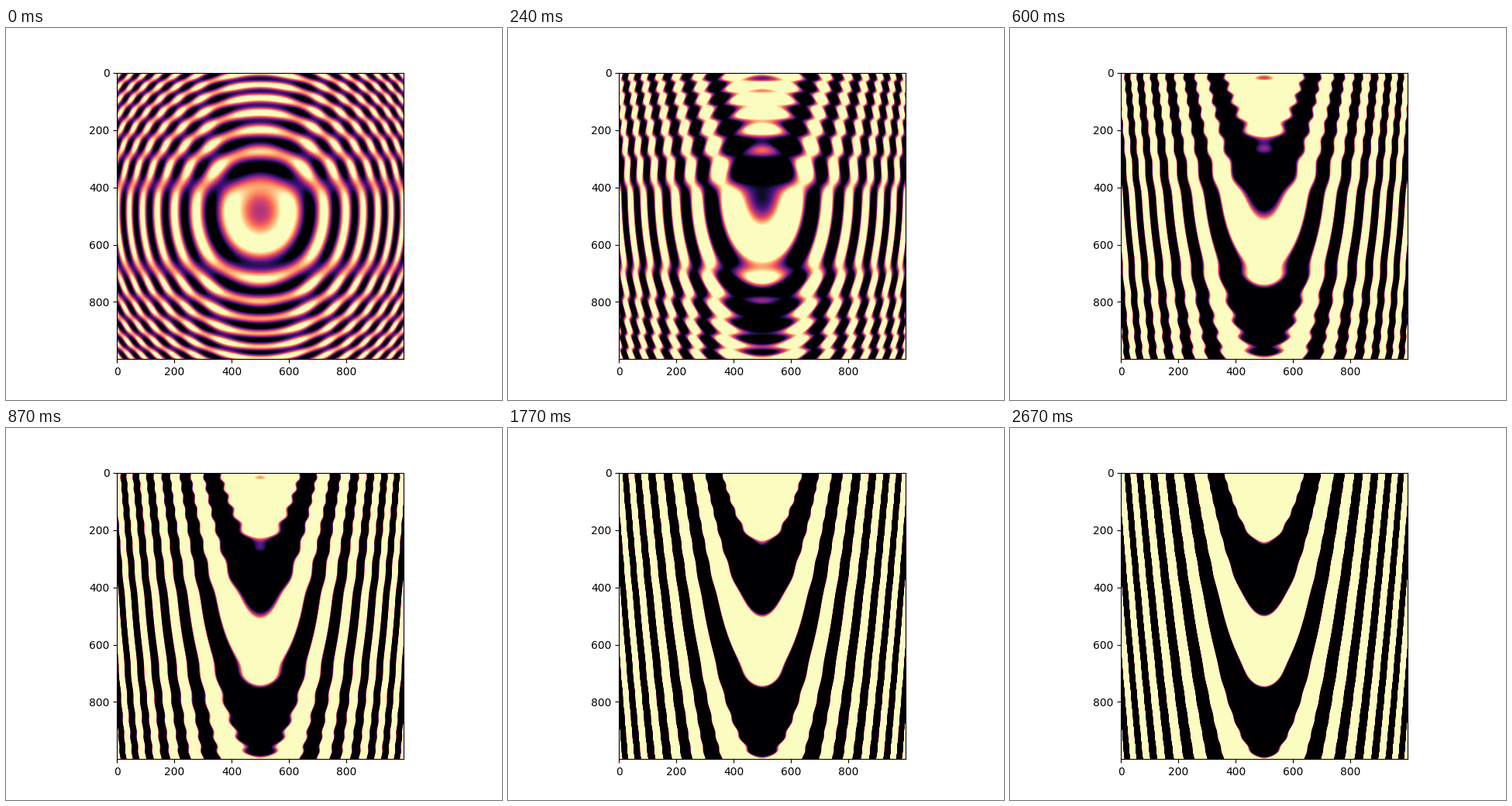
Recreate the animation shown at these times as a matplotlib script. Size 640x480 px, loop 2700 ms.

```python
import numpy as np
import matplotlib.pyplot as plt
from matplotlib.animation import FuncAnimation

FRAMES = 90
INTERVAL = 30
SIZE = 1000
START = 0.4
STEP = 0.2

axis = np.linspace(-2 * np.pi, 2 * np.pi, SIZE, dtype=np.float32)
x, y = np.meshgrid(axis, axis)
rings = np.sin(x**2 + y**2)
parabolas = np.sin(x**2 + y)


def field(i):
    """Circular waves with parabolic waves growing on top of them."""
    return rings + np.float32(START + STEP * i) * parabolas


fig, ax = plt.subplots(figsize=(6.4, 4.8), dpi=100)
# The colour range stays fixed, so the growing sum saturates.
image = ax.imshow(field(0), cmap="magma", vmin=-1, vmax=1)


def update(i):
    image.set_data(field(i))
    return (image,)


anim = FuncAnimation(fig, update, frames=FRAMES, interval=INTERVAL,
                     repeat=True, repeat_delay=0)
plt.show()
```
